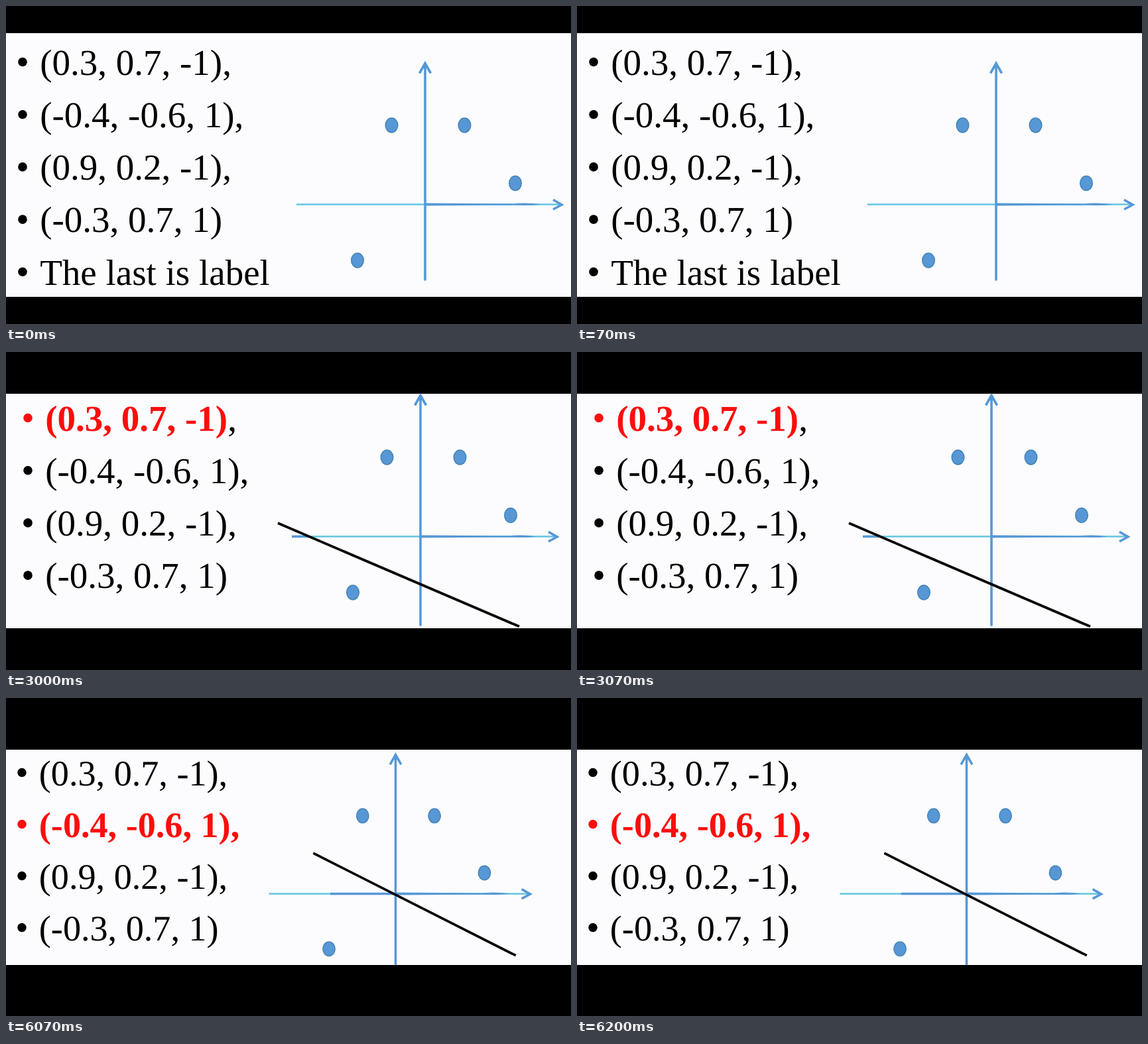
An HTML page for the animation above (8000 ms loop, 852x480 px).

```html
<!DOCTYPE html>
<html lang="en">
<head>
<meta charset="utf-8">
<title>Perceptron samples</title>
<style>
html, body { margin: 0; width: 100%; height: 100%; overflow: hidden; background: #000; }
svg { display: block; width: 100vw; height: 100vh; }
text { font: 55px "Liberation Serif", "Times New Roman", serif; text-rendering: geometricPrecision; white-space: pre; }
.hot { fill: #fd0d0d; }
text .hot { font-weight: bold; }
.axis { fill: none; stroke: #5698d6; stroke-width: 3.6; }
.thin { stroke: #63c6e0; stroke-width: 2.4; }
.wedge { fill: #5698d6; }
.dot { fill: #5797d6; stroke: #4584b2; stroke-width: 1.5; }
.split { stroke: #000; stroke-width: 3.8; }
.scene { visibility: hidden; animation: 8s step-end infinite; }
#s0 { animation-name: first; }
#s1 { animation-name: second; }
#s2 { animation-name: third; }
@keyframes first { 0% { visibility: visible } 37.5%, 100% { visibility: hidden } }
@keyframes second { 0% { visibility: hidden } 37.5% { visibility: visible } 75%, 100% { visibility: hidden } }
@keyframes third { 0% { visibility: hidden } 75%, 100% { visibility: visible } }
</style>
</head>
<body>
<svg id="stage" viewBox="0 0 852 480"></svg>
<script>
const samples = ["(0.3, 0.7, -1),", "(-0.4, -0.6, 1),", "(0.9, 0.2, -1),", "(-0.3, 0.7, 1)"];
const points = [[59.5, -119.5], [-102, 84.5], [136, -32], [-50.5, -119.5]];
const pitch = 79.2;

// list: first bullet; origin: of the plot; down: length of the axis below it
// bold: solid stretch of the left half axis
const scenes = [
  { top: 41, bottom: 439, scale: 1, list: [25, 84.5], origin: [632, 299.5], down: 115,
    lines: [...samples, "The last is label"] },
  { top: 63, bottom: 417, scale: 1, list: [33, 99.5], origin: [625, 278.5], down: 135,
    lines: samples, hot: 0, cut: 14, bold: [-194, -169],
    split: { slope: 3 / 7, shift: 72, from: -215, to: 149 } },
  { top: 78, bottom: 403, scale: 0.985, list: [24, 112.5], origin: [587.5, 295.5], down: 109,
    lines: samples, hot: 1, cut: 16, bold: [-100, 0],
    split: { slope: 0.506, shift: 1.5, from: -126, to: 184 } }
];

const group = ([x, y], scale, body) => `<g transform="translate(${x} ${y}) scale(${scale})">${body}</g>`;
const stroke = (name, d) => `<path class="${name}" d="${d}"/>`;

function listRow(line, i, s) {
  const y = i * pitch;
  const mark = i === s.hot ? 'class="hot"' : "";
  const words = mark ? `<tspan ${mark}>${line.slice(0, s.cut)}</tspan>${line.slice(s.cut)}` : line;
  return `<circle cy="${y}" r="6.8" ${mark}/><text x="26.2" y="${y + 19.3}">${words}</text>`;
}

function plot({ down, bold, split }) {
  return stroke("axis thin", "M-194 0H206")
    + (bold ? stroke("axis", `M${bold[0]} 0H${bold[1]}`) : "")
    + stroke("wedge", "M0 -2L140 -1V1L0 2ZM125 0Q150 -4 175 0Q150 3 125 0")
    + stroke("axis", `M0 ${down}V-213M-8.5 -198L0 -213L8.5 -198M193 -7L206 .5L193 7.5`)
    + points.map(([x, y]) => `<ellipse class="dot" cx="${x}" cy="${y}" rx="9.3" ry="11"/>`).join("")
    + (split ? stroke("split", [split.from, split.to]
        .map((x, i) => `${"ML"[i]}${x} ${x * split.slope + split.shift}`).join("")) : "");
}

const draw = (s, i) => `<g class="scene" id="s${i}">
  <rect y="${s.top}" width="852" height="${s.bottom - s.top}" fill="#fcfcfe"/>
  ${group(s.list, s.scale, s.lines.map((line, n) => listRow(line, n, s)).join(""))}
  ${group(s.origin, s.scale, plot(s))}</g>`;

document.getElementById("stage").innerHTML = scenes.map(draw).join("");
</script>
</body>
</html>
```
